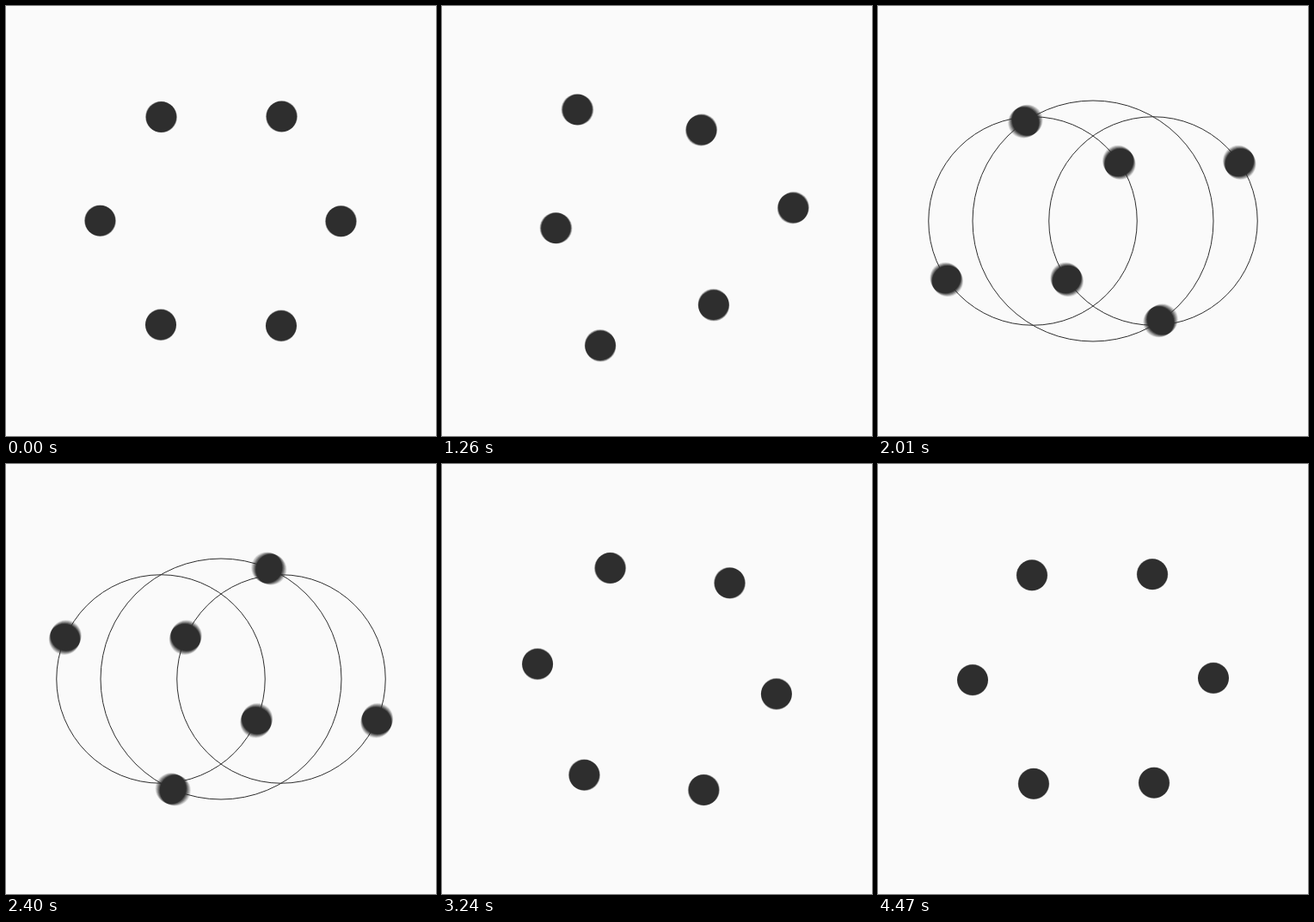
Write an HTML page with a canvas that moves like this. It is 500 px wide and 500 px high and loops after 4500 ms.

```html
<!DOCTYPE html>
<html lang="en">
<head>
<meta charset="utf-8">
<title>Hexagon orbits</title>
<style>
  html, body { margin: 0; width: 100%; height: 100%; overflow: hidden; background: #fafafa; }
  canvas { display: block; width: 500px; height: 500px; }
</style>
</head>
<body>
<canvas id="stage" width="500" height="500"></canvas>
<script>
const SIZE = 500, PAPER = '#fafafa', INK = '#2e2e2e';
const HEX_R = 140, DOT_R = 18;
const STEP = 30, STEPS_PER_PHASE = 50;
const SAMPLES = 8, SHUTTER = 0.6;

// Each phase turns rings of hexagon corners about their common centre.
const PHASES = [
  [[3, 4], [5, 0], [1, 2]],
  [[2, 4], [1, 5], [0, 3]],
  [[0, 1, 2, 3, 4, 5]]
].map(phase => phase.map(makeRing));

const out = document.getElementById('stage').getContext('2d');
const layer = document.createElement('canvas');
layer.width = layer.height = SIZE;
const pen = layer.getContext('2d');

function corner(k) {
  const a = k * Math.PI / 3;
  return { x: SIZE / 2 + HEX_R * Math.cos(a), y: SIZE / 2 + HEX_R * Math.sin(a) };
}

function makeRing(ids) {
  const pts = ids.map(corner), n = pts.length;
  const x = pts.reduce((s, p) => s + p.x, 0) / n;
  const y = pts.reduce((s, p) => s + p.y, 0) / n;
  return {
    x, y,
    r: Math.hypot(pts[0].x - x, pts[0].y - y),
    angles: pts.map(p => Math.atan2(p.y - y, p.x - x)),
    turn: 2 * Math.PI / n
  };
}

const clamp = v => Math.min(1, Math.max(0, v));
const ease = u => (u + u * u * (3 - 2 * u)) / 2;
const ringAlpha = u => clamp((0.3 - Math.abs(u - 0.5)) / 0.1);

function circle(x, y, r) {
  pen.beginPath();
  pen.arc(x, y, r, 0, 2 * Math.PI);
}

function drawScene(pos) {
  const total = pos / STEPS_PER_PHASE;
  const rings = PHASES[Math.floor(total) % PHASES.length];
  const u = total % 1;

  pen.globalAlpha = 1;
  pen.fillStyle = PAPER;
  pen.fillRect(0, 0, SIZE, SIZE);

  pen.globalAlpha = ringAlpha(u);
  pen.strokeStyle = INK;
  pen.lineWidth = 1;
  for (const { x, y, r } of rings) {
    circle(x, y, r);
    pen.stroke();
  }

  pen.globalAlpha = 1;
  pen.fillStyle = INK;
  for (const { x, y, r, angles, turn } of rings) {
    for (const a of angles) {
      const b = a + turn * ease(u);
      circle(x + r * Math.cos(b), y + r * Math.sin(b), DOT_R);
      pen.fill();
    }
  }
}

// Motion blur: a running average of moments while the shutter is open.
function render(ms) {
  const step = Math.floor(ms / STEP) % (STEPS_PER_PHASE * PHASES.length);
  for (let i = 0; i < SAMPLES; i++) {
    drawScene(step + SHUTTER * i / SAMPLES);
    out.globalAlpha = 1 / (i + 1);
    out.drawImage(layer, 0, 0);
  }
}

const start = performance.now() - 4;
function tick() {
  render(performance.now() - start);
  requestAnimationFrame(tick);
}
tick();
</script>
</body>
</html>
```
